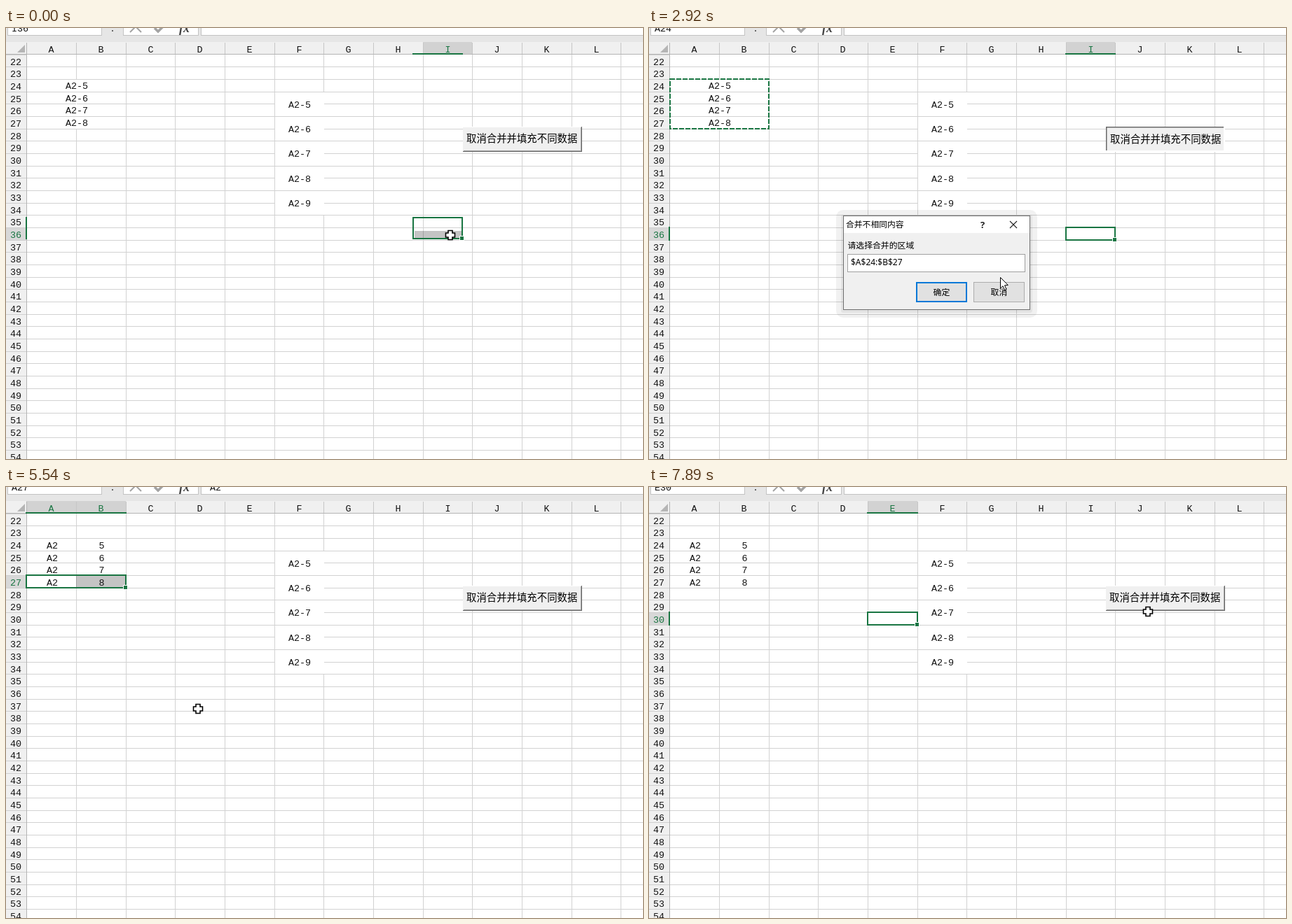
An HTML page with a canvas that plays this animation: 909 by 616 pixels, repeating every 8 s.

```html
<!DOCTYPE html>
<html lang="zh">
<head>
<meta charset="utf-8">
<title>Spreadsheet demo</title>
<style>
html, body { margin: 0; width: 100%; height: 100%; overflow: hidden; background: #fff; }
canvas { display: block; }
</style>
</head>
<body>
<canvas id="stage" width="909" height="616"></canvas>
<script>
const ctx = document.getElementById('stage').getContext('2d');
const LOOP = 8000;
const GREEN = '#197542', INK = '#141414', GRID = '#d2d2d2';
const MONO = '13.4px "Liberation Mono", monospace';
const CJK = '"Noto Sans CJK SC", "Noto Sans CJK", sans-serif';
const colX = c => Math.floor(29.9 + 70.67 * c);
const rowY = r => Math.floor(38 + 17.67 * (r - 22));

// Each step holds until the next; fields carry over unless replaced.
// sel: [col, row, lastCol, lastRow]; box: outline while the selection glides.
const steps = [
  [0, { name: 'I36', formula: '', sel: [8, 36, 8, 36], box: [580, 270, 72, 32], cur: ['cross', 634, 296],
        click: false, pressed: false, dialog: 0, split: false, ants: null, input: '', caret: true, hot: '' }],
  [140, { box: [591, 281, 73, 23], cur: ['cross', 702, 238] }],
  [270, { box: null, cur: ['cross', 754, 196] }],
  [410, { cur: ['cross', 758, 188] }],
  [530, { cur: ['cross', 759, 182] }],
  [810, { cur: ['arrow', 775, 151] }],
  [930, { click: true, pressed: true }],
  [1060, { click: false, cur: ['cross', 806, 186], dialog: .35 }],
  [1180, { cur: ['cross', 818, 200], dialog: .8 }],
  [1300, { cur: ['cross', 528, 250], dialog: .96 }],
  [1450, { cur: ['cross', 400, 196], dialog: 1 }],
  [1570, { cur: ['cross', 262, 136] }],
  [1690, { cur: ['cross', 166, 99], caret: false }],
  [1810, { cur: ['cross', 124, 87] }],
  [1950, { cur: ['cross', 108, 89] }],
  [2080, { cur: ['cross', 98, 90] }],
  [2220, { click: true, name: 'A24', ants: [0, 24, 1, 24], input: '$A$24' }],
  [2340, { cur: ['cross', 103, 113], name: '3R x 2C', ants: [0, 24, 1, 26], input: '$A$24:$B$26' }],
  [2460, { cur: ['cross', 108, 133], name: '4R x 2C', ants: [0, 24, 1, 27], input: '$A$24:$B$27' }],
  [2630, { click: false }],
  [2920, { cur: ['arrow', 501, 356], name: 'A24' }],
  [3050, { cur: ['arrow', 587, 440] }],
  [3200, { cur: ['arrow', 528, 386], hot: 'cancel' }],
  [3320, { cur: ['arrow', 510, 418], hot: '' }],
  [3460, { cur: ['arrow', 468, 402], caret: true }],
  [3580, { cur: ['arrow', 442, 388], hot: 'ok' }],
  [3700, { cur: ['arrow', 436, 383], caret: false }],
  [3850, { click: true, hot: 'down', name: '', ants: null }],
  [4530, { click: false, dialog: .5 }],
  [4690, { dialog: 0, pressed: false, split: true, sel: [0, 27, 1, 27], name: 'A25', formula: 'A2',
           cur: ['cross', 436, 383] }],
  [4830, { name: 'A26' }],
  [4960, { name: 'A27' }],
  [5540, { cur: ['cross', 274, 317] }],
  [5660, { click: true, sel: [3, 37, 3, 37], box: [170, 243, 92, 20], name: 'D37', formula: '' }],
  [5780, { click: false, box: null, cur: ['cross', 188, 170] }],
  [5930, { cur: ['cross', 147, 113] }],
  [6080, { cur: ['cross', 82, 80] }],
  [6230, { click: true, cur: ['cross', 80, 68], sel: [0, 23, 0, 23], name: 'A23' }],
  [6370, { cur: ['cross', 122, 100], sel: [0, 23, 1, 24], name: '2R x 2C' }],
  [6500, { cur: ['cross', 150, 124], sel: [0, 23, 1, 26], name: '4R x 2C' }],
  [6620, { cur: ['cross', 159, 133], sel: [0, 23, 1, 27], box: [29, 54, 143, 90], name: '5R x 2C' }],
  [6770, { box: null }],
  [7070, { click: false }],
  [7220, { cur: ['cross', 240, 160] }],
  [7350, { click: true, cur: ['cross', 325, 189], sel: [4, 30, 4, 30], box: [242, 150, 86, 38], name: 'E30' }],
  [7470, { click: false, box: null }],
  [7610, { cur: ['cross', 621, 193] }],
  [7760, { cur: ['cross', 676, 184] }],
  [7890, { cur: ['cross', 712, 178] }]
];
let last = {};
const states = steps.map(([, change]) => last = { ...last, ...change });

function fill(color, x, y, w, h) {
  ctx.fillStyle = color;
  ctx.fillRect(x, y, w, h);
}
function frame(color, x, y, w, h, line = 1) {
  ctx.strokeStyle = color;
  ctx.lineWidth = line;
  ctx.strokeRect(x + line / 2, y + line / 2, w - line, h - line);
}
function text(str, x, y, font = MONO, color = INK, align = 'left') {
  ctx.font = font;
  ctx.fillStyle = color;
  ctx.textAlign = align;
  ctx.fillText(str, x, y);
}
function path(points, close) {
  ctx.beginPath();
  points.forEach(([x, y]) => ctx.lineTo(x, y));
  if (close) ctx.closePath();
}
const cellText = (str, x, y) => text(str, x, y, MONO, INK, 'center');

function drawToolbar(s) {
  fill('#e6e6e6', 0, 0, 909, 20);
  for (const [x, w] of [[2, 135], [167, 108], [278, 640]]) {
    fill('#fff', x, -4, w, 15);
    frame('#c3c3c3', x, -4, w, 15);
  }
  text(s.name, 8, 5);
  text(s.formula, 291, 5);
  fill('#666', 151, 3, 2, 2);
  ctx.strokeStyle = '#a3a3a3';
  ctx.lineWidth = 2;
  path([[177, 6], [185, -2], [193, 6]]);
  ctx.stroke();
  ctx.lineWidth = 3.5;
  path([[212, 0], [217, 5], [225, -3]]);
  ctx.stroke();
  text('fx', 247, 6, 'italic bold 18px "Liberation Serif", serif', '#444');
}

function drawGrid(s) {
  fill('#fff', 30, 38, 879, 578);
  for (let c = 1; c < 13; c++) fill(GRID, colX(c), 38, 1, 578);
  for (let r = 23; r < 55; r++) fill(GRID, 30, rowY(r), 879, 1);
  for (let i = 0; i < 5; i++) {
    const r = 25 + 2 * i;
    fill('#fff', colX(5) + 1, rowY(r) + 1, 70, rowY(r + 2) - rowY(r) - 1);
    cellText('A2-' + (5 + i), 419, rowY(r) + 23);
  }
  if (!s.split) for (let r = 24; r < 28; r++) fill('#fff', 100, rowY(r) + 1, 1, 17);
}

function drawValues(s) {
  for (let i = 0; i < 4; i++) {
    const y = rowY(24 + i) + 15;
    if (s.split) {
      cellText('A2', 66, y);
      cellText(String(5 + i), 136.5, y);
    } else cellText('A2-' + (5 + i), 101, y - 1);
  }
}

function rangeBox([c0, r0, c1, r1]) {
  const x = colX(c0), y = rowY(r0);
  return [x - 1, y - 1, colX(c1 + 1) - x + 2, rowY(r1 + 1) - y + 2];
}

function drawHeaders(s, [x, y, w, h]) {
  const [c0, r0, c1, r1] = s.sel;
  fill('#f0f0f0', 0, 20, 909, 18);
  fill('#f0f0f0', 0, 38, 30, 578);
  for (let c = 0; c < 13; c++) {
    const on = c >= c0 && c <= c1;
    if (on) fill('#d2d2d2', colX(c), 20, colX(c + 1) - colX(c), 18);
    fill('#c6c6c6', colX(c), 21, 1, 17);
    if (c < 12) text('ABCDEFGHIJKL'[c], colX(c) + 35.5, 35, MONO, on ? GREEN : INK, 'center');
  }
  for (let r = 22; r < 55; r++) {
    const on = r >= r0 && r <= r1;
    if (on) fill('#d8d8d8', 0, rowY(r), 29, rowY(r + 1) - rowY(r));
    fill('#cfcfcf', 0, rowY(r), 29, 1);
    text(String(r), 14, rowY(r) + 15, MONO, on ? GREEN : INK, 'center');
  }
  fill('#b4b4b4', 0, 37, 909, 1);
  fill('#b4b4b4', 29, 21, 1, 595);
  ctx.fillStyle = '#b5b5b5';
  path([[27, 24], [27, 35], [16, 35]], true);
  ctx.fill();
  fill(GREEN, x, 36, w, 2);
  fill(GREEN, 28, y, 2, h);
}

function drawSelection(s, [x, y, w, h]) {
  const [c0, r0, c1, r1] = s.sel;
  const shade = 'rgba(0,0,0,.23)';
  if (s === states[0]) fill(shade, 583, 290, 67, 10);
  for (let r = r0; r <= r1; r++) for (let c = c0; c <= c1; c++) {
    if (c > c0 || r > r0) fill(shade, colX(c), rowY(r), colX(c + 1) - colX(c), rowY(r + 1) - rowY(r));
  }
  frame(GREEN, x, y, w, h, 2);
  fill('#fff', x + w - 5, y + h - 5, 7, 7);
  fill(GREEN, x + w - 4, y + h - 4, 5, 5);
}

function drawAnts(range) {
  const [x, y, w, h] = rangeBox(range);
  ctx.setLineDash([7, 2]);
  frame(GREEN, x + 1, y, w - 1, h, 2);
  ctx.setLineDash([]);
}

function drawMacroButton(pressed) {
  fill('#f0f0f0', 652, 141, 170, 36);
  if (pressed) {
    fill('#fff', 652, 175, 170, 2);
    fill('#fff', 820, 141, 2, 36);
    fill('#696969', 652, 141, 168, 1.5);
    fill('#696969', 652, 141, 1.5, 34);
  } else {
    fill('#fff', 652, 141, 170, 1);
    fill('#a0a0a0', 653, 175, 168, 1);
    fill('#a0a0a0', 820, 142, 1, 34);
    fill('#696969', 652, 176, 170, 1);
    fill('#696969', 821, 141, 1, 36);
  }
  const d = pressed ? 1 : 0;
  text('取消合并并填充不同数据', 657 + d, 163 + d, '14.4px ' + CJK, '#000');
}

function drawDialogButton(label, x, w, hot, isDefault) {
  const down = hot === 'down';
  fill(down ? '#cce4f7' : hot ? '#e5f1fb' : '#e1e1e1', x, 363, w, 29);
  frame(down ? '#005499' : isDefault || hot ? '#0078d7' : '#adadad', x, 363, w, 29, isDefault ? 2 : 1);
  if (down) {
    ctx.setLineDash([1, 1]);
    frame('#222', x + 3, 366, w - 6, 23);
    ctx.setLineDash([]);
  }
  text(label, x + w / 2 + (down ? 1 : 0), down ? 383 : 382, '11.9px ' + CJK, '#000', 'center');
}

function drawDialog(s) {
  ctx.save();
  ctx.globalAlpha = s.dialog;
  const scale = 1 - .09 * (1 - s.dialog);
  ctx.translate(410.5, 335.5);
  ctx.scale(scale, scale);
  ctx.translate(-410.5, -335.5);

  for (const [grow, a] of [[10, .055], [3, .06]]) {
    ctx.fillStyle = `rgba(0,0,0,${a})`;
    ctx.beginPath();
    ctx.roundRect(277 - grow, 270 - grow, 267 + 2 * grow, 134 + 2 * grow, grow);
    ctx.fill();
  }
  fill('#f0f0f0', 277, 268, 267, 135);
  fill('#fff', 277, 268, 267, 25);
  frame('#6e6e6e', 277, 268, 267, 135);
  text('合并不相同内容', 281, 285, '11.8px ' + CJK, '#000');
  text('?', 476, 286, 'bold 13px "Open Sans", sans-serif', '#222', 'center');
  ctx.strokeStyle = '#222';
  ctx.lineWidth = 1.1;
  for (const d of [-5, 5]) {
    path([[520 - d, 276], [520 + d, 286]]);
    ctx.stroke();
  }
  text('请选择合并的区域', 283.5, 315, '11.85px ' + CJK, '#000');
  fill('#fff', 283, 323, 254, 26);
  frame('#a0a0a0', 283, 323, 254, 26);
  text(s.input, 288, 339, '12px "Noto Sans", sans-serif', '#000');
  if (s.caret) fill('#000', s.input ? 361 : 289, 326, 1, 17);
  drawDialogButton('确定', 381, 73, s.hot === 'cancel' ? '' : s.hot, true);
  drawDialogButton('取消', 463, 73, s.hot === 'cancel' ? 'over' : '', false);
  ctx.restore();
}

function drawCursor([kind, x, y], click) {
  ctx.save();
  ctx.translate(x, y);
  ctx.strokeStyle = '#000';
  if (click) {
    ctx.beginPath();
    ctx.arc(kind === 'arrow' ? 2 : 0, 0, 9.5, 0, 7);
    ctx.fillStyle = 'rgba(255,255,255,.35)';
    ctx.fill();
    ctx.lineWidth = 1;
    ctx.stroke();
  }
  ctx.fillStyle = '#fff';
  if (kind === 'cross') {
    const a = 3, b = 6.5;
    path([[-a, -b], [a, -b], [a, -a], [b, -a], [b, a], [a, a],
          [a, b], [-a, b], [-a, a], [-b, a], [-b, -a], [-a, -a]], true);
    ctx.lineWidth = 1.6;
  } else {
    path([[.5, .5], [.5, 16], [4, 12.8], [6.6, 18.6], [9, 17.5], [6.5, 11.8], [11.3, 11.5]], true);
    ctx.lineWidth = 1;
  }
  ctx.fill();
  ctx.stroke();
  ctx.restore();
}

function draw(s) {
  const box = s.box || rangeBox(s.sel);
  drawGrid(s);
  drawSelection(s, box);
  drawValues(s);
  drawToolbar(s);
  drawHeaders(s, box);
  if (s.ants) drawAnts(s.ants);
  drawMacroButton(s.pressed);
  if (s.dialog) drawDialog(s);
  drawCursor(s.cur, s.click);
}

const start = performance.now();
let shown = -1;
function tick() {
  const t = (performance.now() - start) % LOOP;
  const i = steps.findLastIndex(([at]) => at <= t);
  if (i !== shown) draw(states[shown = i]);
  requestAnimationFrame(tick);
}
tick();
</script>
</body>
</html>
```
